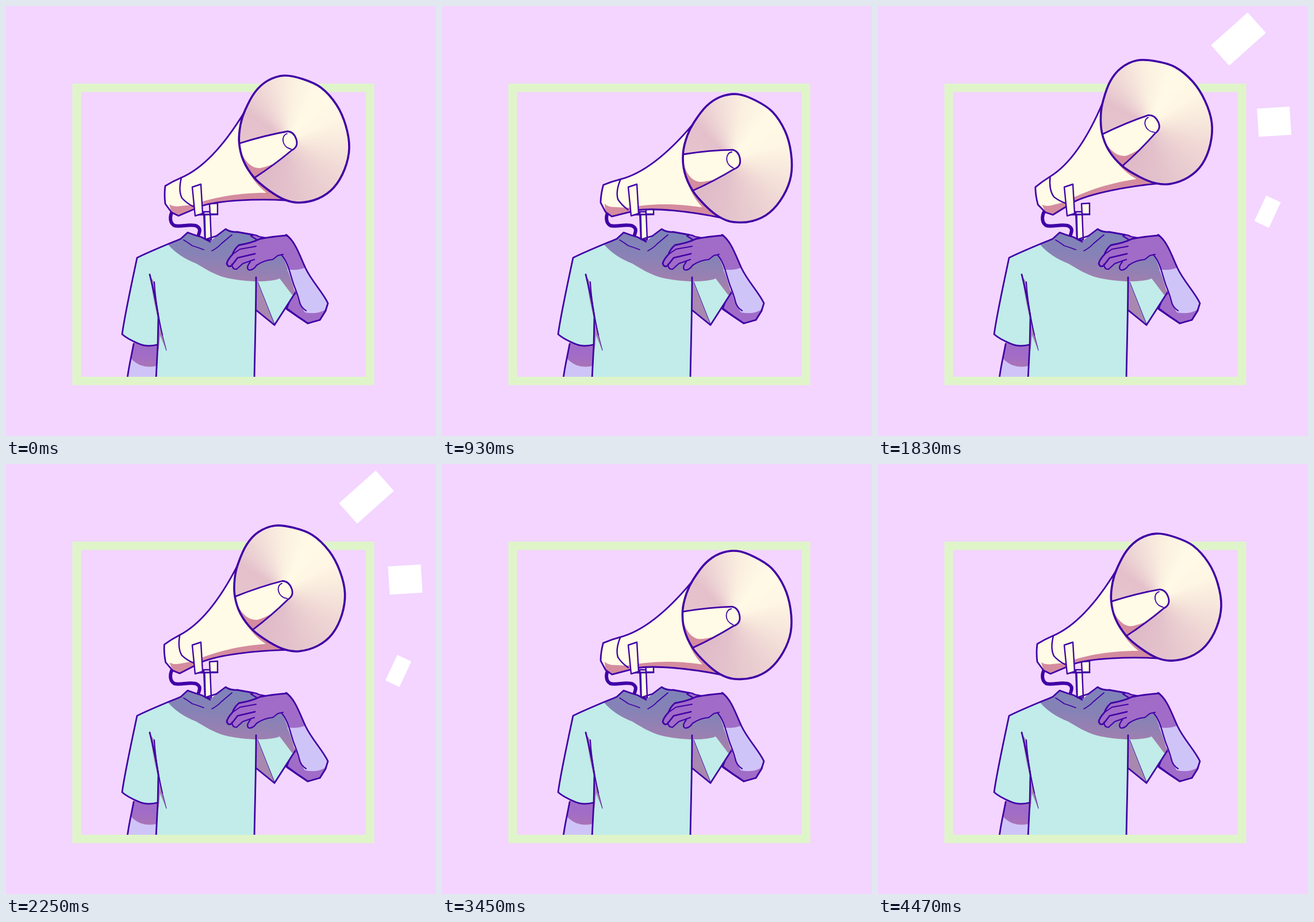
An HTML page with a canvas for the animation above (4500 ms loop, 748 by 748 pixels).

```html
<!DOCTYPE html>
<html lang="en">
<head>
<meta charset="utf-8">
<title>Megaphone head</title>
<style>
html, body { margin: 0; width: 100%; height: 100%; overflow: hidden; background: #f3d5ff; }
canvas { display: block; width: 748px; height: 748px; }
</style>
</head>
<body>
<canvas id="stage" width="748" height="748"></canvas>
<script>
const ctx = document.getElementById('stage').getContext('2d');
const LOOP = 4500, STEP = 30;
const INK = '#4000a6', CREAM = '#fffbe6', PINK = '#d58c9f', TEAL = '#c1ece9';
const MAUVE = '#a888ae', SKIN = '#a06cc8', SKIN_LIGHT = '#cfc4f7';
const PIVOT = { x: 290, y: 336 };

function shape(d, fill, line, width = 2.8) {
  const path = new Path2D(d);
  if (fill) { ctx.fillStyle = fill; ctx.fill(path); }
  if (line) { ctx.strokeStyle = line; ctx.lineWidth = width; ctx.stroke(path); }
}
const ink = (d, width) => shape(d, null, INK, width);

// Closed Catmull-Rom curve through the points, as SVG path data.
function loopThrough(pts) {
  const n = pts.length, at = i => pts[(i + n) % n];
  let d = `M${pts[0]}`;
  for (let i = 0; i < n; i++) {
    const [a, b, c, e] = [at(i - 1), at(i), at(i + 1), at(i + 2)];
    d += `C${b[0] + (c[0] - a[0]) / 6} ${b[1] + (c[1] - a[1]) / 6} ` +
         `${c[0] - (e[0] - b[0]) / 6} ${c[1] - (e[1] - b[1]) / 6} ${c[0]} ${c[1]}`;
  }
  return d + 'Z';
}

function gradient(g, stops) {
  stops.forEach(([at, color]) => g.addColorStop(at, color));
  return g;
}

const rim = loopThrough([
  [484, 121], [516, 127], [548, 142], [575, 172], [591, 208], [597, 247], [589, 284],
  [570, 316], [543, 335], [510, 342], [485, 337], [459, 322], [432, 299], [413, 269],
  [405.5, 237], [408, 206], [416, 181], [433, 150], [455, 130]
]);
const bellFill = gradient(ctx.createConicGradient(0, 490, 235), [
  [0, '#f8eadd'], [0.08, '#f1dad6'], [0.16, '#e9cdd0'], [0.25, '#e3c1cb'], [0.35, '#dfbac8'],
  [0.5, '#e5c4cd'], [0.6, '#e4c0cb'], [0.68, '#f0d9d7'], [0.76, '#fbf0e0'], [0.84, '#fffae6'],
  [0.93, '#fff6e4'], [1, '#f8eadd']
]);
const shadeFill = gradient(ctx.createLinearGradient(360, 392, 352, 482), [
  [0, '#7e83b8'], [0.45, '#8782b6'], [0.75, '#9780b2'], [1, '#a680ac']
]);
const armShade = gradient(ctx.createLinearGradient(0, 588, 0, 630), [
  [0, SKIN], [0.4, SKIN], [1, '#aa74b6']
]);

const mix = (a, b, p) => a + (b - a) * p;
const sway = p => (1 - Math.cos(Math.PI * p)) / 2;
const progress = (t, from, to) => Math.min(1, Math.max(0, (t - from) / (to - from)));

// Head angle in degrees at equally spaced keys.
const KEYS = [0, 8.9, -8.5, 0, 8.9, 0], KEY_GAP = 900;
function headAngle(t) {
  const i = Math.floor(t / KEY_GAP);
  return mix(KEYS[i], KEYS[i + 1], sway(t / KEY_GAP - i));
}

const PAPERS = [
  { start: 1250, end: 1780, from: [525, 235], to: [627, 57.5], tilt: -41.8, w: 85.7, h: 47.6, flip: 0, spin: 120 },
  { start: 900, end: 1860, from: [523, 209], to: [694.5, 201], tilt: -3.5, w: 57, h: 49, flip: 0, spin: 167 },
  { start: 900, end: 1860, from: [528, 290], to: [682.5, 360], tilt: 25, w: 47, h: 49, flip: 55, spin: 46 }
];
function drawPapers(t) {
  if (t < 1100 || t > 2475) return;
  ctx.fillStyle = '#fff';
  for (const s of PAPERS) {
    const p = progress(t, s.start, s.end);
    if (p === 0) continue;
    const turn = (s.flip - s.spin * (1 - p)) * Math.PI / 180;
    ctx.save();
    ctx.translate(mix(s.from[0], s.to[0], p), mix(s.from[1], s.to[1], p));
    ctx.rotate(s.tilt * Math.PI / 180);
    ctx.scale(Math.cos(turn), 1);
    ctx.fillRect(-s.w / 2, -s.h / 2, s.w, s.h);
    ctx.restore();
  }
}

function drawFrame() {
  ctx.fillStyle = '#f3d5ff';
  ctx.fillRect(0, 0, 748, 748);
  ctx.fillStyle = '#dff5c9';
  ctx.fillRect(115.5, 135, 525, 524.5);
  ctx.fillStyle = '#f3d5ff';
  ctx.fillRect(130.5, 149.5, 495.5, 495.5);
}

function drawMount() {
  shape('M344 358L355 358L357 407L346 406Z', CREAM, INK, 2.4);
  ink('M346 364L347 404', 1.6);
  ink('M290 356C284 366 285 378 293 382C304 385 322 378 332 383C339 387 337 392 335 398', 6);
  shape('M354 344L368 343L368 362L355 362Z', CREAM, INK, 2.4);
  ink('M331 363L368 362.5', 3);
}

function drawBody() {
  ctx.save();
  ctx.beginPath();
  ctx.rect(130, 149, 496, 496);
  ctx.clip();

  // Hanging arm
  shape('M222 585L211 648L261 648L264 586Z', SKIN_LIGHT);
  shape('M222 585L218 614Q236 632 262 626L264 586Z', armShade);
  ink('M222 588C218 610 214 625 211 648');

  // Upper arm behind the sleeve
  shape('M500 495L488 527L507 540L525 552L546 546L556 530L525 520Z', SKIN, INK);

  // Shirt
  shape('M228 438C250 428 280 415 304 405L316 394L338 402L354 411L366 400L382 388L400 393L428 397' +
        'L480 440L491 462L503 499L467 555L435 529L432 648L261 648L264 589Q245 594 230 587Q211 579 202 571' +
        'C207 538 217 488 228 438Z', TEAL);
  shape('M282 415L304 405L316 394L338 402L354 411L366 400L382 388L400 393L428 397L480 432L492 462' +
        'L503 499L498 503L476 474C460 481 415 481 380 472C362 467 348 458 331 448Q300 436 282 415Z', shadeFill);
  shape('M436 477L467 554L435 529Z', MAUVE);
  shape('M251 470L259 482Q261 515 270 560L279 600L268 573L265 602L265 545Q256 515 251 470Z', MAUVE);

  ink('M264 589Q245 594 230 587Q211 579 202 571C206 540 217 490 228 438C250 427 280 415 304 405L316 394' +
      'Q329 399 340 402L355 410');
  ink('M347 406L366 400L382 388Q391 394 402 393L430 398');
  ink('M309 407Q316 411 324 417Q334 420 344 424', 1.8);
  ink('M358 426Q369 420 374 414L393 398', 1.8);
  ink('M250 467C254 484 261 512 265 541L264 590L261 648');
  ink('M258 480C259 508 267 551 272 572', 2);
  ink('M272 572L279 599', 1);
  ink('M435 472C435 530 433 590 432 648');
  ink('M435 529L467 555L503 499');
  ink('M438 480L467 553', 1);

  // Bent forearm
  shape('M478 432L487 398C503 408 512 437 521 456C532 479 549 498 560 517L556 530L546 546L525 552' +
        'L509 534L514 522C503 497 497 459 478 432Z', SKIN);
  shape('M489 458Q506 461 521 455C532 479 549 498 560 517L554 529Q541 537 520 533L513 522' +
        'C503 498 498 478 489 458Z', SKIN_LIGHT);
  ink('M487 398C503 408 512 437 521 456C532 479 551 498 560 517L556 530L546 546L525 552L507 540L488 526');
  ink('M478 432C491 444 495 470 501 486Q507 501 510 512Q512 524 522 530', 2.2);

  // Hand
  shape('M426 400Q432 396 440 401L457 404L440 409Z', SKIN, INK, 2.2);
  shape('M487 398Q463 401 442 405Q428 412 405 416Q397 423 394 432Q385 442 384 448Q386 455 392 452L396 449' +
        'Q392 458 401 458L412 449L425 445Q417 455 422 459Q429 461 436 451Q449 442 464 441L482 431L491 435Z', SKIN);
  ink('M489 399Q463 401 442 405Q428 412 405 416Q397 423 394 432Q385 442 384 448Q386 455 392 452L403 438L433 431');
  ink('M393 449Q393 458 401 458L412 448L432 441', 2.2);
  ink('M425 445Q417 455 422 459Q429 461 436 451Q449 442 464 441L473 434L482 432', 2.2);
  ink('M394 432L407 423L435 418', 2);
  ctx.restore();
}

function drawHead(angle) {
  ctx.save();
  ctx.translate(PIVOT.x, PIVOT.y);
  ctx.rotate(angle * Math.PI / 180);
  ctx.translate(-PIVOT.x, -PIVOT.y);

  // Cone
  const cone = 'M277 313Q290 305 304 299C347 281 384 235 415 184L480 230L490 338C435 335 370 338 340 348' +
               'L300 365L288 359L277 344Q275 328 277 313Z';
  shape(cone, CREAM);
  shape('M284 345Q292 350 303 348L324 346C355 335 395 325 453 325Q430 307 421 284L450 300L492 338' +
        'C435 335 370 338 340 348L300 365L288 359Z', PINK);
  ink('M488 338C435 335 370 338 340 348L300 365L288 359L277 344Q275 328 277 313Q290 305 304 299' +
      'C347 281 384 235 415 184');
  ink('M305 299C301 315 302 326 306 334Q314 343 326 349', 2.4);

  // Bell
  shape(rim, bellFill);
  ctx.save();
  ctx.clip(new Path2D(rim));
  shape('M405 240Q450 226 490 218Q507 220 506 238Q505 247 497 252L432 299L400 280Z', CREAM);
  shape('M404 240C411 266 425 283 442 282Q457 279 470 272L432 299L404 280Z', PINK);
  ctx.restore();
  ink('M406 239Q450 225 490 218Q501 219 505 232Q509 245 497 251Q466 277 432 299');
  ink('M489 222C478 225 479 245 496 249', 1.8);
  ink(rim, 3.6);
  ctx.restore();

  shape('M324 315L339 310L342 361L329 365Z', CREAM, INK, 2.4);
}

function draw(t) {
  drawFrame();
  drawPapers(t);
  drawMount();
  drawBody();
  drawHead(headAngle(t));
}

ctx.lineJoin = ctx.lineCap = 'round';
const begin = performance.now();
function tick() {
  const t = (performance.now() - begin) % LOOP;
  draw(Math.floor(t / STEP) * STEP);
  requestAnimationFrame(tick);
}
tick();
</script>
</body>
</html>
```
